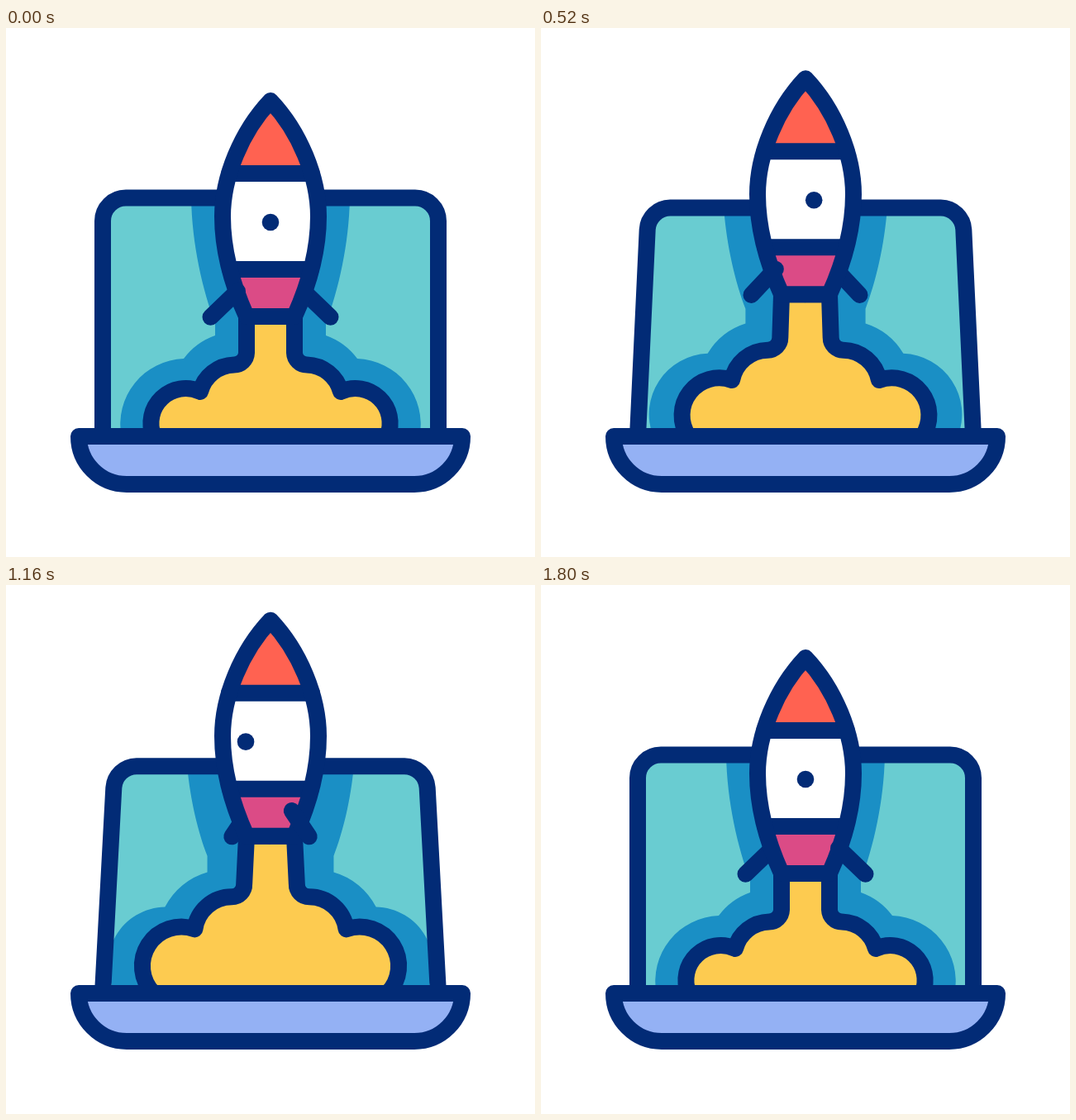
An HTML page with a canvas that plays this animation: 640 by 640 pixels, repeating every 2000 ms.

```html
<!DOCTYPE html>
<html lang="en">
<head>
<meta charset="utf-8">
<title>Laptop rocket launch</title>
<style>
  html, body { margin: 0; width: 100%; height: 100%; overflow: hidden; background: #fff; }
  canvas { display: block; width: 640px; height: 640px; }
</style>
</head>
<body>
<canvas width="640" height="640"></canvas>
<script>
const ctx = document.querySelector('canvas').getContext('2d');
const LOOP = 2000, STEP = 40;
const NAVY = '#022b76', TEAL = '#69ccd1', BLUE = '#1a8fc5', YELLOW = '#fdcb50',
      RED = '#ff6251', PINK = '#db4b86', LILAC = '#94b1f4';

const BODY = new Path2D('M320 88C285 125 262 180 262 228C262 275 277 318 291 349' +
                        'H349C363 318 378 275 378 228C378 180 355 125 320 88Z');
const BANDS = new Path2D('M270 176H370M271 292H369');
const BASE = new Path2D('M88 494H552A58 58 0 0 1 494 552H146A58 58 0 0 1 88 494Z');

const mix = (a, b, k) => a + (b - a) * k;

// Symmetric cubic-bezier(a, 0, 1 - a, 1) between two times
function ease(time, start, end, a) {
  const x = Math.min(1, Math.max(0, (time - start) / (end - start)));
  let low = 0, high = 1;
  for (let i = 0; i < 24; i++) {
    const s = (low + high) / 2, r = 1 - s;
    if (3 * r * r * s * a + 3 * r * s * s * (1 - a) + s ** 3 < x) low = s; else high = s;
  }
  return low * low * (3 - 2 * low);
}

function paint(path, fill) {
  if (fill) { ctx.fillStyle = fill; ctx.fill(path); }
  ctx.stroke(path);
}

function isolated(draw) {
  ctx.save();
  draw();
  ctx.restore();
}

function mirrored(draw) {
  isolated(draw);
  isolated(() => { ctx.translate(640, 0); ctx.scale(-1, 1); draw(); });
}

function drawScreen(tilt, rise) {
  const m = (a, b) => mix(a, b, tilt), g = (a, b) => mix(a, b, rise);
  const outline = `M117 494L${m(117, 134.5)} ${m(233.5, 249)}` +
    `A28 28 0 0 1 ${m(145, 162)} ${m(205.5, 223.5)}H320`;
  const panel = new Path2D(outline + 'V494Z');
  const glow = new Path2D(`M320 ${g(200, 180)}H${g(224, 217)}` +
    `C${g(224, 217)} ${g(258, 236)} ${g(238, 229)} ${g(318, 290)} ${g(253, 243)} ${g(357, 326)}` +
    `V${g(372, 346)}A${g(81, 83)} ${g(81, 83)} 0 0 0 ${g(215, 191)} ${g(400, 389)}` +
    `A${g(79.5, 69)} ${g(79.5, 69)} 0 0 0 ${g(139.6, 132.5)} 494H320Z`);
  mirrored(() => {
    ctx.fillStyle = TEAL;
    ctx.fill(panel);
    isolated(() => {
      ctx.clip(panel);
      ctx.fillStyle = BLUE;
      ctx.fill(glow);
    });
    ctx.stroke(new Path2D(outline));
  });
}

function drawFlame(rise, lift) {
  const g = (a, b) => mix(a, b, rise);
  const lobe = g(43.4, 45.4), puff = g(42, 47.6);
  const cloud = new Path2D(`M320 ${349 + lift}H291L${g(291, 288)} ${g(393, 360)}` +
    `A15 15 0 0 1 ${g(276, 273)} ${g(407.5, 375.5)}` +
    `A${lobe} ${lobe} 0 0 0 ${g(235, 228)} ${g(440, 415)}` +
    `A${puff} ${puff} 0 0 0 178.5 494H320`);
  mirrored(() => paint(cloud, YELLOW));
}

function drawFin(turn) {
  ctx.stroke(new Path2D(`M${mix(280, 360, turn)} 318.5L${mix(247.5, 392.5, turn)} 349.7`));
}

function drawRocket(lift, turn, windowX) {
  isolated(() => {
    ctx.translate(0, lift);
    drawFin(1 - turn);
    isolated(() => {
      ctx.clip(BODY);
      [[RED, 80, 96], ['#fff', 176, 116], [PINK, 292, 60]].forEach(([color, y, height]) => {
        ctx.fillStyle = color;
        ctx.fillRect(250, y, 140, height);
      });
      ctx.fillStyle = NAVY;
      ctx.beginPath();
      ctx.arc(windowX, 235, 10.3, 0, 7);
      ctx.fill();
    });
    paint(BANDS);
    paint(BODY);
    drawFin(turn);
  });
}

function render(time) {
  const rise = ease(time, 80, 930, 0.7) - ease(time, 960, 1800, 0.7);
  const tilt = ease(time, 80, 840, 0.55) - ease(time, 850, 1690, 0.55);
  const lift = -48 * rise;

  // Half a turn: speeds up to the middle, then slows down the same way
  const side = time < 940 ? 1 : -1;
  const fromMiddle = Math.abs(time - 940);
  const half = 0.5 * Math.max(0, 1 - fromMiddle / 860) ** 3.5;
  const turn = side > 0 ? half : 1 - half;
  const windowX = 320 + side * 0.00013 * Math.max(0, 700 - fromMiddle) ** 2;

  ctx.fillStyle = '#fff';
  ctx.fillRect(0, 0, 640, 640);
  ctx.strokeStyle = NAVY;
  ctx.lineWidth = 20;
  ctx.lineCap = ctx.lineJoin = 'round';
  drawScreen(tilt, rise);
  drawFlame(rise, lift);
  drawRocket(lift, turn, windowX);
  paint(BASE, LILAC);
}

const begin = performance.now();
function tick() {
  const time = (performance.now() - begin) % LOOP;
  render(Math.floor(time / STEP) * STEP);
  requestAnimationFrame(tick);
}
tick();
</script>
</body>
</html>
```
